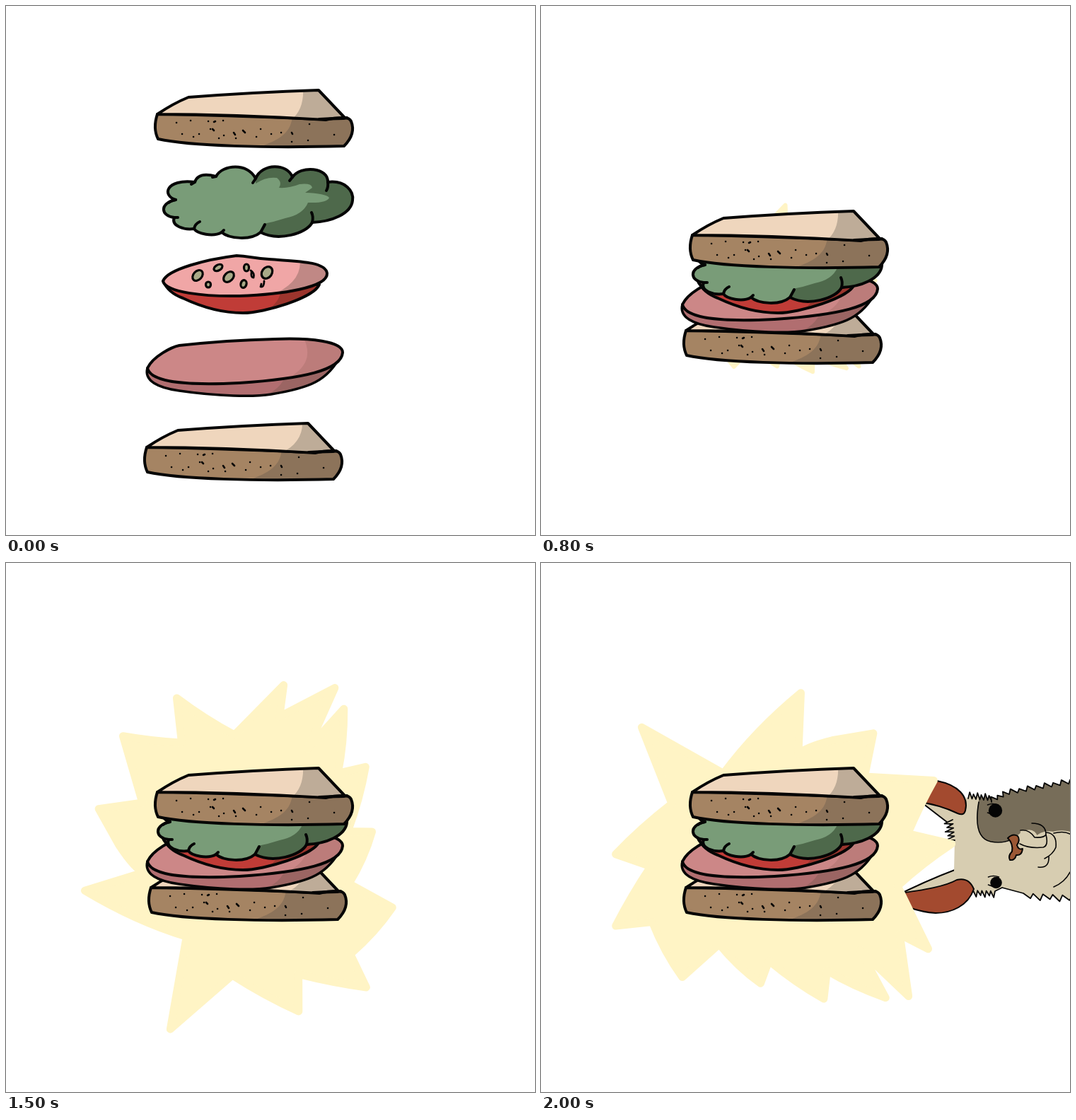
These frames come from a looping animation (748 px wide and 748 px high, 2100 ms). An HTML page with a canvas:

```html
<!DOCTYPE html>
<html>
<head>
<meta charset="utf-8">
<title>Sandwich</title>
<style>
html, body { margin: 0; height: 100%; overflow: hidden; background: #fff; }
canvas { display: block; }
</style>
</head>
<body>
<canvas id="stage" width="748" height="748"></canvas>
<script>
const ctx = document.getElementById('stage').getContext('2d');
const STEP = 100, STEPS = 21;

// Fills an outline, paints tones clipped inside it, then strokes it.
function shape(outline, fill, tones = [], width = 4) {
  const path = new Path2D(outline);
  ctx.fillStyle = fill;
  ctx.fill(path);
  ctx.save();
  ctx.clip(path);
  for (const [area, colour] of tones) {
    ctx.fillStyle = colour;
    ctx.fill(new Path2D(area));
  }
  ctx.restore();
  if (width) line(outline, width);
}

function line(d, width = 4) {
  ctx.lineWidth = width;
  ctx.strokeStyle = '#050505';
  ctx.stroke(new Path2D(d));
}

function at(x, y, draw) {
  ctx.save();
  ctx.translate(x, y);
  draw();
  ctx.restore();
}

function ellipse(x, y, rx, ry, degrees, fill, width) {
  ctx.beginPath();
  ctx.ellipse(x, y, rx, ry, degrees * Math.PI / 180, 0, 7);
  ctx.fillStyle = fill;
  ctx.fill();
  if (width) {
    ctx.lineWidth = width;
    ctx.stroke();
  }
}

// Path segment of hair spikes that stand to the left of the way a -> b.
function fur(ax, ay, bx, by, count, height) {
  const dx = bx - ax, dy = by - ay, length = Math.hypot(dx, dy);
  let d = `L${ax} ${ay}`;
  for (let i = 0; i < count; i++) {
    const tip = (i + 0.25) / count, base = (i + 1) / count;
    const h = height * (i % 2 ? 0.75 : 1);
    d += `L${ax + dx * tip + dy / length * h} ${ay + dy * tip - dx / length * h}`;
    d += `L${ax + dx * base} ${ay + dy * base}`;
  }
  return d;
}

const CRUMBS = 'M241 165h.1M261 162h.1M286 163h.1M307 162h.1M249 181h.1M265 185h.1M273 181h.1' +
  'M289 174h.1M301 187h.1M308 183h.1M354 185h.1M360 174h.1M375 181h.1' +
  'M389 179h.1M404 192h.1M429 167h.1M427 190h.1M464 182h.1M325 187h.1';
const FLAKES = 'M294 164l2-1M292 174l2 2M322 179l2 3M335 176l3 3M404 179l1 2';

function bread(shadeX) {
  shape('M214 153C210 165 210 178 215 188C260 198 370 201 478 198C486 190 494 178 488 163Q485 157 477 159L440 160Q300 154 214 153Z',
    '#a58463', [['M405 150C406 180 385 190 356 200H500V150Z', '#8c735a']]);
  shape('M214 153Q236 138 258 129Q350 122 442 119L479 158Q462 158 452 161Q320 153 214 153Z',
    '#efd6bd', [[`M${shadeX} 115Q${shadeX + 2} 147 402 162H490V115Z`, '#beac98']]);
  line('M443 160Q462 159 482 158');
  line(CRUMBS, 2.5);
  line(FLAKES, 2.6);
}

function lettuce() {
  shape('M240 274C220 268 226 244 267 249Q272 234 297 241C306 224 342 221 353 244C362 222 398 222 405 242' +
    'C417 225 456 228 455 249C480 246 492 262 490 275C488 294 460 305 433 306C425 322 385 333 360 320' +
    'C346 332 315 329 305 320C293 327 270 322 266 315C252 317 233 311 238 299C219 297 216 279 240 274Z',
    '#4e694b', [['M353 251Q368 241 383 243Q391 249 386 257Q400 258 415 252Q432 250 433 257L423 264' +
    'Q452 265 457 271Q454 279 427 278Q420 295 395 300Q380 305 364 308L355 335H200V215H353Z', '#799c78']]);
  line('M240 274Q233 275 230 278M267 249L262 252M297 241L292 242M353 244L349 250M405 242L401 247' +
    'M455 249Q456 256 453 261M433 306Q435 298 432 292M360 320L366 309M305 320L308 317' +
    'M266 315Q267 308 274 305M238 299L243 299');
}

function tomato() {
  shape('M222 389Q230 406 250 413C290 432 320 434 335 434C365 434 435 413 443 394Z',
    '#c03c37', [['M388 400Q390 420 358 438H460V390Z', '#9b352d']]);
  shape('M222 389C228 372 285 358 326 353C345 354 350 357 372 358C405 361 452 360 454 378' +
    'C455 398 390 408 330 410C280 411 226 405 222 389Z',
    '#f0a6a6', [['M415 355Q422 392 368 412H460V355Z', '#c08885']]);
  for (const [x, y, rx, ry, turn] of [[271, 381, 6, 8.5, 42], [300, 370, 4, 6.5, 60], [315, 383, 6, 8.5, 45],
    [286, 394, 3.5, 4, 0], [340, 370, 3.5, 5, 0], [336, 393, 4, 5.5, 15], [369, 377, 7, 9, 35]])
    ellipse(x, y, rx, ry, turn, '#a9aa88', 3.2);
  line('M346 374Q352 378 350 384Q346 384 347 377M365 389Q365 398 360 397L361 393', 2.8);
}

function ham() {
  shape('M200 512C195 530 215 540 245 544C300 552 350 553 375 549C430 540 455 530 474 493Z',
    '#b16e70', [['M396 515Q395 540 358 555H490V490Z', '#9b6563']], 3.6);
  shape('M200 512C208 495 235 482 245 480C300 474 340 472 380 471C430 469 476 474 476 490' +
    'C474 515 420 527 330 533C270 536 205 535 200 512Z',
    '#cc8787', [['M419 465C437 500 420 518 382 535H490V465Z', '#bc7c7a']]);
}

function burst([scale, degrees, x, y]) {
  ctx.save();
  ctx.translate(x, y);
  ctx.rotate(degrees * Math.PI / 180);
  ctx.scale(scale, scale);
  ctx.translate(-345.5, -389);
  const path = new Path2D('M251 306Q290 242 350 183L354 270Q362 259 400 246L457 231L450 293L548 290' +
    'Q532 325 518 368L581 377Q542 408 510 443L561 528L519 511L539 597L465 538L507 602' +
    'Q460 590 421 571L420 611Q378 592 338 564L329 597Q295 577 266 547L218 598Q190 566 169 524' +
    'L118 534Q136 490 160 446L109 433Q142 392 182 355L130 251L251 306Z');
  ctx.fillStyle = ctx.strokeStyle = '#fff4c5';
  ctx.lineWidth = 11;
  ctx.fill(path);
  ctx.stroke(path);
  ctx.restore();
}

const CROWN = fur(604, 333, 637, 336, 6, 9) + fur(637, 338, 662, 327, 3, 7) + fur(662, 327, 770, 308, 9, 7);
const CHEEK = fur(765, 471, 682, 467, 6, 9) + 'L652 459' + fur(642, 464, 611, 463, 5, 9);
const FOREHEAD = fur(585, 392, 582, 363, 5, 12);

function llama() {
  const light = '#d7cdb1', rust = '#a34a2f';
  shape('M536 337L584 374L606 362L600 350Z', light, [], 2);
  shape('M495 474Q545 449 585 434L604 452Z', light, [], 2);
  shape(`M601 331${CROWN}L770 471${CHEEK}L584 436${FOREHEAD}L601 350Z`, light,
    [['M619 335C614 365 617 390 636 394Q662 397 680 380Q697 372 703 388Q730 374 748 380' +
    'L780 375V290H640Z', '#776d59']], 0);
  for (const hair of [CROWN, CHEEK, FOREHEAD]) line('M' + hair.slice(1), 1.8);
  shape('M560 308C590 314 605 330 600 350Q598 358 589 354Q564 342 535 338Z', rust, [], 2);
  shape('M500 468C545 462 572 457 588 448Q605 444 612 461C604 485 580 495 558 495Q540 494 520 487Z', rust, [], 2);
  shape('M678 378Q690 376 698 388Q708 377 725 380Q755 376 770 390V425H725Q718 432 705 430' +
    'Q706 419 708 402Q690 405 677 394Z', light, [], 0);
  line('M619 338C614 367 617 390 636 394Q652 397 665 391M678 378Q690 376 698 388' +
    'M694 368Q714 368 714 384Q711 389 698 388M677 397Q690 404 710 402Q718 400 714 384' +
    'M714 381Q730 382 728 402Q724 412 712 418M725 382Q745 377 754 388M703 430Q719 432 718 415M725 458Q741 451 748 437', 1.6);
  shape('M660 389Q667 382 674 386Q678 391 673 399Q675 406 681 404Q680 414 672 413Q670 421 663 420Q660 414 666 408Q668 397 660 389Z',
    '#9b5734', [], 2);
  for (const [x, y, r] of [[642.5, 350, 9.7], [643.5, 452, 8.3]]) {
    ellipse(x, y, r, r, 0, '#050505');
    line(`M${x - 11} ${y - 8}Q${x - 4} ${y - 11} ${x + 4} ${y - 8}M${x - 11} ${y + 3}L${x - 3} ${y + 6}`, 1.6);
  }
}

// Offsets after two steps and after six, from the bottom layer up.
const LAYERS = [
  { draw: () => bread(434), home: [-15, 471], mid: [8, -84], end: [6, -165] },
  { draw: ham, home: [0, 0], mid: [1.5, -61], end: [0, -90] },
  { draw: tomato, home: [0, 0], mid: [0, 0], end: [0, 0] },
  { draw: lettuce, home: [0, 0], mid: [-3.7, 69.3], end: [-8, 92] },
  { draw: () => bread(420), home: [0, 0], mid: [-2, 84], end: [0, 171] }
];

function offset({ home, mid, end }, step) {
  const late = Math.min(Math.max(step - 2, 0) / 4, 1);
  return home.map((h, i) => h + mid[i] * Math.min(step / 2, 1) + (end[i] - mid[i]) * late);
}

// Scale, angle and centre for each step from 800 ms on.
const BURST_START = 8;
const BURST = [
  [0.55, 0, 343, 395], [0.7, 0, 344, 393], [0.85, 0, 345, 391], [1, 0, 345.5, 389],
  [1, -14.4, 327, 391], [1, 75.5, 362, 413.5], [1, 165.5, 337, 440], [1, 255.5, 312, 416],
  [1, 345.6, 322.5, 388.5], [1, 75.5, 352, 408], [1, 165.5, 316, 420], [1, 5, 345, 388.5]
];

function render(now) {
  const step = Math.floor(now / STEP) % STEPS;
  ctx.fillStyle = '#fff';
  ctx.fillRect(0, 0, 748, 748);
  ctx.lineJoin = ctx.lineCap = 'round';
  if (step > 16) at((20 - step) * 60, 0, llama);
  if (step >= BURST_START) burst(BURST[Math.min(step - BURST_START, BURST.length - 1)]);
  for (const layer of LAYERS) at(...offset(layer, step), layer.draw);
}

const start = performance.now();
function tick() {
  render(performance.now() - start);
  requestAnimationFrame(tick);
}
tick();
</script>
</body>
</html>
```
